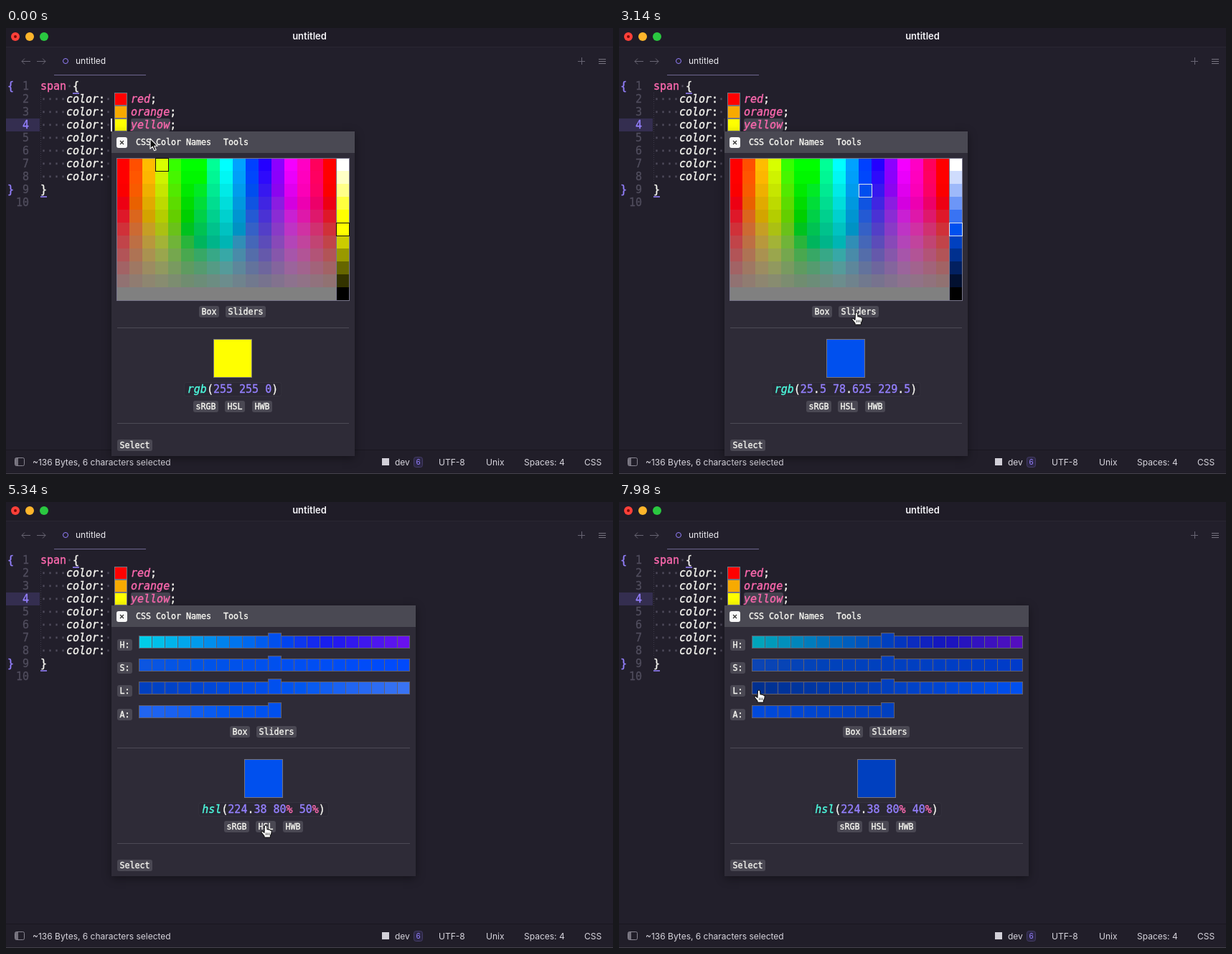
Recreate the animation shown at these times as an HTML page with a canvas. Size 846 by 621 pixels, loop 8000 ms.

```html
<!DOCTYPE html>
<html lang="en">
<head>
<meta charset="utf-8">
<title>Color picker</title>
<style>
  html, body { margin: 0; width: 100%; height: 100%; overflow: hidden; background: #221f2b; }
  canvas { display: block; }
</style>
</head>
<body>
<canvas id="stage" width="846" height="621"></canvas>
<script>
const ctx = document.getElementById('stage').getContext('2d');
const LOOP = 8000, STEP = 87.2;
const UI = 'Inter, sans-serif', MONO = '"DejaVu Sans Mono", monospace';
const CODE = `15px ${MONO}`, LABEL = `11.65px ${MONO}`;
const BG = '#221f2b', PANEL = '#2e2b37', BUTTON = '#4a4853', EDGE = '#62616f';
const WHITE = '#f8f8f2', PINK = '#ff6ab0', PURPLE = '#9580ff', CYAN = '#4dfbdf', MUTED = '#504d5d';
const HUE = 224.38;

// Times at which a click takes effect.
const PICK_BLUE = 1750, SHOW_SLIDERS = 3320, SHOW_HSL = 5340, DARKEN = 7100;

// Pointer path as [time, x, y]; the pointer swaps between arrow and hand at each toggle.
const POINTER = [
  [90, 201, 154], [880, 327, 222], [1390, 341, 227], [1950, 341, 227],
  [2620, 333, 406], [3140, 331, 396], [3850, 331, 396], [4460, 304, 348],
  [4630, 345, 440], [5070, 362, 450], [5430, 362, 450], [6130, 205, 248],
  [6210, 204, 246], [6560, 198, 256], [7750, 198, 256], [7900, 195, 262]
];
const HAND_TOGGLES = [500, 2380, 2530, 3410, 4700, 5430, 6290];

// Picker colours are meant for a Display P3 screen; convert them to clipped sRGB.
function p3(...rgb) {
  const [r, g, b] = rgb.map(v => {
    v = Math.min(1, Math.max(0, v / 255));
    return v <= .04045 ? v / 12.92 : ((v + .055) / 1.055) ** 2.4;
  });
  const linear = [
    1.2249 * r - .2249 * g,
    -.042 * r + 1.042 * g,
    -.0197 * r - .0786 * g + 1.0983 * b
  ];
  const encoded = linear.map(v => {
    v = Math.min(1, Math.max(0, v));
    return Math.round(255 * (v <= .0031308 ? v * 12.92 : 1.055 * v ** (1 / 2.4) - .055));
  });
  return `rgb(${encoded.join(' ')})`;
}

function hsl(h, s, l) {
  const amp = s / 100 * Math.min(l, 100 - l) / 100;
  const channel = n => {
    const k = (n + h / 30) % 12;
    return 255 * (l / 100 - amp * Math.max(-1, Math.min(k - 3, 9 - k, 1)));
  };
  return p3(channel(0), channel(8), channel(4));
}

function box(x, y, w, h, fill, stroke) {
  ctx.fillStyle = fill;
  ctx.fillRect(x, y, w, h);
  if (stroke) outline(x, y, w, h, stroke);
}

function outline(x, y, w, h, color) {
  ctx.strokeStyle = color;
  ctx.lineWidth = 1;
  ctx.strokeRect(x + .5, y + .5, w - 1, h - 1);
}

function rounded(x, y, w, h, r, fill, stroke) {
  ctx.beginPath();
  ctx.roundRect(x, y, w, h, r);
  if (fill) { ctx.fillStyle = fill; ctx.fill(); }
  if (stroke) { ctx.strokeStyle = stroke; ctx.lineWidth = 1; ctx.stroke(); }
}

function circle(x, y, r, fill, stroke) {
  rounded(x - r, y - r, 2 * r, 2 * r, r, fill, stroke);
}

function line(points, color, width = 1) {
  ctx.beginPath();
  points.forEach(([x, y]) => ctx.lineTo(x, y));
  ctx.strokeStyle = color;
  ctx.lineWidth = width;
  ctx.stroke();
}

// A hairline stroke gives monospaced text its slightly heavier look.
function text(str, x, y, font, color, align = 'left') {
  ctx.font = font;
  ctx.fillStyle = ctx.strokeStyle = color;
  ctx.textAlign = align;
  ctx.fillText(str, x, y);
  if (font.includes(MONO)) {
    ctx.lineWidth = .35;
    ctx.strokeText(str, x, y);
  }
  return ctx.measureText(str).width;
}

function button(label, x, y, w) {
  rounded(x, y, w, 16, 3, BUTTON);
  text(label, x + w / 2, y + 12, LABEL, WHITE, 'center');
}

function drawWindow() {
  box(0, 0, 846, 621, BG);
  box(0, 0, 846, 26, '#1f1c27');
  box(0, 26, 846, 1, '#292632');
  ['#ff4039', '#fdb52b', '#2ac840'].forEach((color, i) => circle(13 + 20 * i, 12, 6, color));
  circle(13, 12, 2, '#7c0906');
  text('untitled', 423, 16, `600 13px ${UI}`, '#f4f3f7', 'center');

  for (const [x, dir] of [[28, -1], [49, 1]]) {
    line([[x - 6, 46.5], [x + 6, 46.5]], '#686573');
    line([[x + 2 * dir, 42.5], [x + 6 * dir, 46.5], [x + 2 * dir, 50.5]], '#686573');
  }
  circle(83, 46, 3.5, null, PURPLE);
  text('untitled', 97, 50, `12px ${UI}`, '#eeedf2');
  box(67, 65, 128, 1, '#6d668f');
  line([[797, 46.5], [807, 46.5]], '#686573');
  line([[802.5, 41], [802.5, 51]], '#686573');
  for (const y of [43, 46, 49]) box(826, y, 10, 1, '#777480');

  box(0, 587, 846, 1, '#191720');
  box(0, 588, 846, 33, '#211e29');
  rounded(12.5, 598.5, 13, 11, 2, null, '#888591');
  box(13, 599, 4, 10, '#74717c');
  const status = (str, x) => text(str, x, 609, `12px ${UI}`, '#d8d6de');
  status('~136 Bytes, 6 characters selected', 37);
  box(524, 599, 10, 10, '#d2d0d8');
  status('dev', 542);
  rounded(568.5, 597.5, 12, 14, 3, '#2c2744', '#443c66');
  text('6', 574.5, 608, `10px ${UI}`, PURPLE, 'center');
  status('UTF-8', 603);
  status('Unix', 669);
  status('Spaces: 4', 722);
  status('CSS', 806);
  box(0, 620, 846, 1, '#45424c');
}

function drawEditor(caret) {
  const baseline = n => 68 + 18 * n;
  box(0, 126, 47, 18, '#342e50');
  for (let n = 1; n <= 10; n++) text(n, 32, baseline(n), CODE, n === 4 ? PURPLE : MUTED, 'right');
  text('{', 2, baseline(1), CODE, PURPLE);
  text('}', 2, baseline(9), CODE, PURPLE);
  text('span', 48, baseline(1), CODE, PINK);
  text('·', 84, baseline(1), CODE, MUTED);
  text('{', 93, baseline(1), CODE, WHITE);
  text('}', 48, baseline(9), CODE, WHITE);
  box(93, 90, 9, 2, '#7d6cd0');
  box(48, 234, 9, 2, '#7d6cd0');

  for (let n = 2; n <= 8; n++) {
    text('····', 48, baseline(n), CODE, MUTED);
    text('color', 84, baseline(n), 'italic ' + CODE, WHITE);
    text(':', 129, baseline(n), CODE, WHITE);
    text('·', 138, baseline(n), CODE, MUTED);
  }
  ctx.setLineDash([1, 2]);
  line([[48.5, 90], [48.5, 216]], '#3d3a48');
  ctx.setLineDash([]);

  rounded(174, 126, 55, 18, 3, '#45424f');
  [['red', '#f00'], ['orange', '#f7aa00'], ['yellow', '#ff0']].forEach(([name, color], i) => {
    const n = i + 2;
    box(151, baseline(n) - 14, 18, 18, color, '#77757f');
    const w = text(name, 174, baseline(n), 'italic ' + CODE, PINK);
    text(';', 174 + w, baseline(n), CODE, WHITE);
  });
  ctx.globalAlpha = caret;
  box(146, 126, 2, 18, '#fff');
  ctx.globalAlpha = 1;
}

function drawPanel(w, h) {
  ctx.shadowColor = 'rgba(0,0,0,.4)';
  ctx.shadowBlur = 12;
  ctx.shadowOffsetY = 3;
  box(147, 144, w, h, PANEL);
  ctx.shadowColor = 'transparent';
  box(147, 144, w, 30, '#4a4953');
  rounded(154, 152, 15, 15, 3, '#f8f8f8');
  line([[159, 157], [164, 162]], '#333', 1.3);
  line([[164, 157], [159, 162]], '#333', 1.3);
  text('CSS Color Names', 181, 163, LABEL, WHITE);
  text('Tools', 303, 163, LABEL, WHITE);
}

function drawPalette(blue) {
  const left = 154, top = 181, size = 18, columns = 17, rows = 11;
  const cellX = c => left + size * c, cellY = r => top + size * r;
  for (let r = 0; r < rows; r++) {
    for (let c = 0; c < columns; c++)
      box(cellX(c), cellY(r), size, size, hsl(22.5 * c, 100 - 10 * r, 50));
    const lightness = 100 - 10 * r;
    box(cellX(columns), cellY(r), size, size, blue ? hsl(HUE, 80, lightness) : hsl(60, 100, lightness));
  }
  const border = '#77758a';
  outline(left, top, size * (columns + 1) + 1, size * rows + 1, border);
  box(cellX(columns), top, 1, size * rows, border);

  const select = (c, r) => outline(cellX(c), cellY(r), size + 1, size + 1, blue ? '#dfe3ee' : '#111');
  if (blue) select(10, 2);
  else select(3, 0);
  select(columns, 5);
}

function drawSliders(useHsl, lightness) {
  const rows = useHsl ? [
    ['H:', d => hsl(HUE + 3.6 * d, 80, lightness)],
    ['S:', d => hsl(HUE, 80 + d, lightness)],
    ['L:', d => hsl(HUE, 80, lightness + d)]
  ] : [
    ['R:', d => p3(25.5 + 2.55 * d, 78.6, 229.5)],
    ['G:', d => p3(25.5, 78.6 + 2.55 * d, 229.5)],
    ['B:', d => p3(25.5, 78.6, 229.5 + 2.55 * d)]
  ];
  rows.push(['A:', d => hsl(HUE, 80, lightness - d * .6)]);
  rows.forEach(([label, color], r) => {
    const y = Math.round(185.5 + 32.4 * r), cells = r === 3 ? 11 : 21;
    button(label, 155, y + 5, 21);
    for (let i = 0; i < cells; i++) {
      const rise = i === 10 ? 4 : 0;
      box(185 + 18 * i, y - rise, i === 20 ? 18 : 19, 18 + rise, color(i - 10), EDGE);
    }
  });
}

function drawCode(code, cx, y) {
  ctx.font = CODE;
  const width = ctx.measureText(code).width;
  let x = cx - width / 2;
  rounded(x - 4.5, y - 14.5, width + 9, 19, 3, '#2b2834', '#35323e');
  for (const part of code.match(/[a-z]+|\d+|[^a-z\d]/g)) {
    const name = /[a-z]/.test(part);
    const color = name ? CYAN : /\d/.test(part) ? PURPLE : part === '%' ? PINK : WHITE;
    x += text(part, x, y, (name ? 'italic ' : '') + CODE, color);
  }
}

// Everything below the picker; all of it is centred on cx and starts at y.
function drawFooter(cx, y, right, color, code) {
  const rule = ruleY => box(155, ruleY, right - 155, 1, '#4c4a55');
  button('Box', cx - 47, y, 28);
  button('Sliders', cx - 10, y, 56);
  rule(y + 30);
  box(cx - 27, y + 46, 54, 54, color, '#77757f');
  drawCode(code, cx, y + 121);
  button('sRGB', cx - 55, y + 132, 35);
  button('HSL', cx - 11, y + 132, 28);
  button('HWB', cx + 27, y + 132, 28);
  rule(y + 163);
  button('Select', 155, y + 186, 49);
}

const ARROW = new Path2D('M0 0V14.2L3.3 11.2L5.7 16.7L8.1 15.7L5.8 10.3H10.2Z');
const HAND = new Path2D(`M-1.6 1.5Q-1.5 0 0 0Q1.5 0 1.6 1.5L2 6Q3.6 5 4.3 6.5
  Q6 5.7 6.5 7.3Q8.3 7 8.2 9L7.7 12L6.4 14.5V17H-2V15L-6 10.2Q-6.6 8.4 -4.8 8.4L-2 10.4Z`);

function drawPointer(t) {
  const next = POINTER.findIndex(key => key[0] > t);
  const to = next < 0 ? POINTER.at(-1) : POINTER[next];
  const from = next < 0 ? to : POINTER[Math.max(0, next - 1)];
  const p = from === to ? 0 : (t - from[0]) / (to[0] - from[0]);
  const ease = p * p * (3 - 2 * p);
  const hand = HAND_TOGGLES.filter(time => time <= t).length % 2;
  const shape = hand ? HAND : ARROW;
  ctx.save();
  ctx.translate(from[1] + (to[1] - from[1]) * ease, from[2] + (to[2] - from[2]) * ease);
  ctx.fillStyle = hand ? '#fff' : '#111';
  ctx.strokeStyle = hand ? '#111' : '#fff';
  ctx.lineWidth = 1.1;
  ctx.lineJoin = 'round';
  ctx.fill(shape);
  ctx.stroke(shape);
  if (hand) for (const x of [.5, 2.7, 4.9]) line([[x, 10.5], [x, 14]], '#222', .8);
  ctx.restore();
}

function caretAlpha(t) {
  const phase = t / 900 % 1;
  if (phase > .94) return (phase - .94) / .06;
  return Math.min(1, Math.max(0, (.5 - phase) / .12));
}

function draw(t) {
  const tick = Math.floor((t + 10) / STEP) * STEP;
  drawWindow();
  drawEditor(caretAlpha(tick));
  const blue = t >= PICK_BLUE, useHsl = t >= SHOW_HSL;
  const lightness = t >= DARKEN ? 40 : 50;
  const color = blue ? hsl(HUE, 80, lightness) : '#ff0';
  const code = useHsl ? `hsl(224.38 80% ${lightness}%)`
    : blue ? 'rgb(25.5 78.625 229.5)' : 'rgb(255 255 0)';
  if (t < SHOW_SLIDERS) {
    drawPanel(339, 452);
    drawPalette(blue);
    drawFooter(316, 387, 478, color, code);
  } else {
    drawPanel(424, 377);
    drawSliders(useHsl, lightness);
    drawFooter(359, 312, 563, color, code);
  }
  drawPointer(tick);
}

const start = performance.now();
function frame() {
  draw((performance.now() - start) % LOOP);
  requestAnimationFrame(frame);
}
frame();
</script>
</body>
</html>
```
